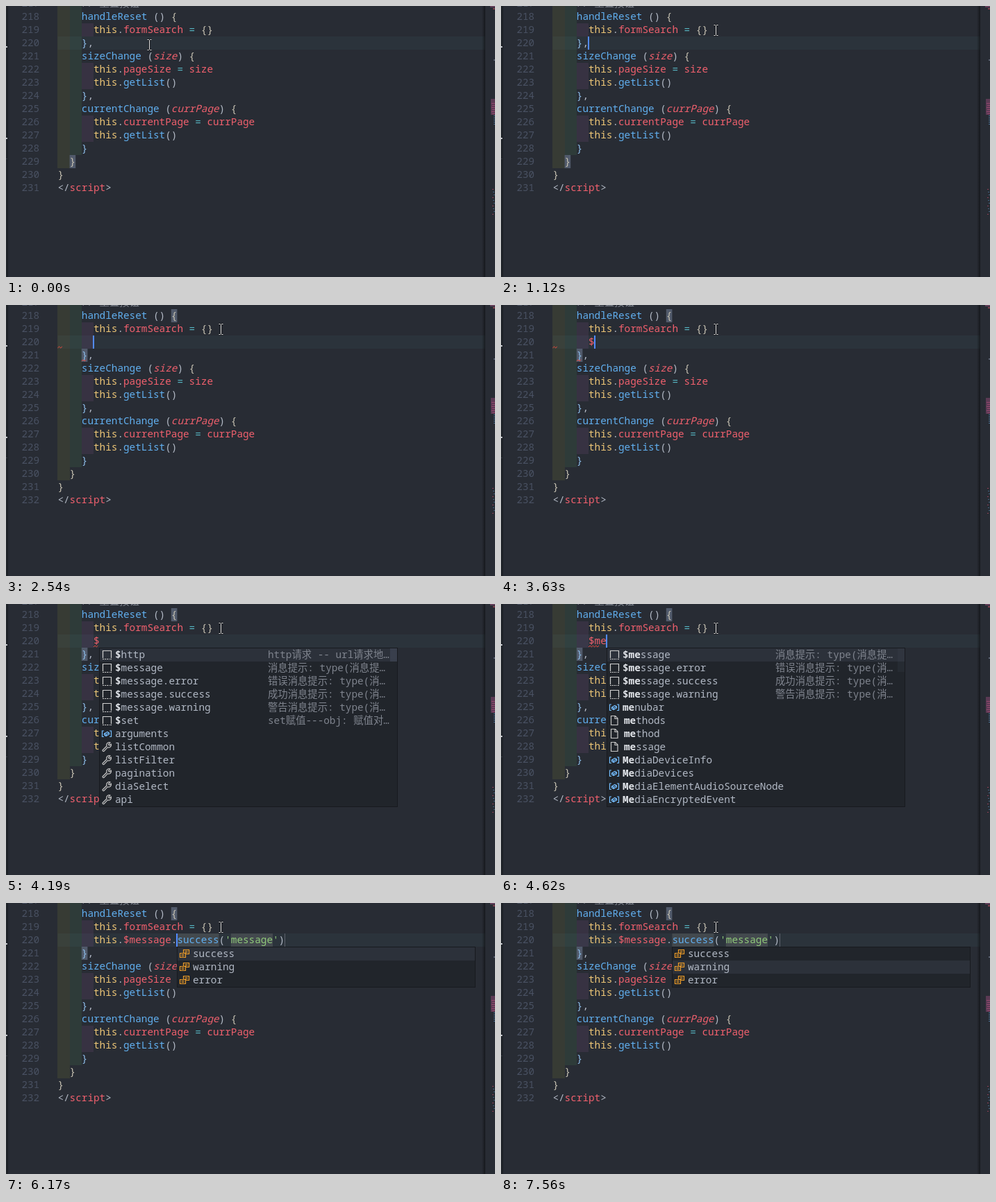
These frames come from a looping animation (704 px wide and 391 px high, 8000 ms). An HTML page with a canvas:

```html
<!DOCTYPE html>
<html lang="zh-CN">
<head>
<meta charset="utf-8">
<title>Snippet completion</title>
<style>
html, body { margin: 0; width: 100%; height: 100%; overflow: hidden; background: #282c34; }
canvas { display: block; }
</style>
</head>
<body>
<canvas id="stage" width="704" height="391"></canvas>
<script>
const ctx = document.getElementById('stage').getContext('2d');
const LOOP = 8000, SIZE = 14.333, CHAR = 8.6, LINE = 19, LEFT = 74.4, TOP = 6, EDGE = 690;
const MONO = '"Noto Sans Mono", "DejaVu Sans Mono", "Noto Sans CJK SC", "Noto Sans CJK", monospace';
const COLOR = {
  plain: '#b2b9c5', red: '#f0606d', blue: '#61afef', yellow: '#ebc476', cyan: '#56b6c2',
  green: '#8fc97a', comment: '#7f848e', number: '#495162', match: '#515a6b', line: '#2b333b',
  brace: '#c9c4b4', methodEnd: '#8fc0ec'
};
const RAINBOW = ['rgba(255,255,64,.07)', 'rgba(127,255,127,.07)', 'rgba(255,127,255,.07)'];

const code = `    handleReset () {
      this.formSearch = {}
    },
    sizeChange (size) {
      this.pageSize = size
      this.getList()
    },
    currentChange (currPage) {
      this.currentPage = currPage
      this.getList()
    }
  }
}
<\/script>`.split('\n');

// Each item: icon, label, matched length, detail
const dollar = [
  ['snippet', '$http', 1, 'http请求 -- url请求地…'],
  ['snippet', '$message', 1, '消息提示: type(消息提…'],
  ['snippet', '$message.error', 1, '错误消息提示: type(消…'],
  ['snippet', '$message.success', 1, '成功消息提示: type(消…'],
  ['snippet', '$message.warning', 1, '警告消息提示: type(消…'],
  ['snippet', '$set', 1, 'set赋值---obj: 赋值对…'],
  ['variable', 'arguments', 0],
  ...['listCommon', 'listFilter', 'pagination', 'diaSelect', 'api'].map(name => ['wrench', name, 0])
];
const message = [
  ...dollar.slice(1, 5).map(([icon, label, , detail]) => [icon, label, 3, detail]),
  ['variable', 'menubar', 2],
  ...['methods', 'method', 'message'].map(name => ['page', name, 2]),
  ...['Info', 's', 'ElementAudioSourceNode', 'EncryptedEvent'].map((end, i) =>
    ['variable', (i < 2 ? 'MediaDevice' : 'Media') + end, 2])
];
const choices = ['success', 'warning', 'error'].map(name => ['enum', name, 0]);

const timeline = [
  [0, { mouse: [206, 56], row: 2, col: 6, caret: false, typed: null, brackets: [[11, 2]],
        squiggles: [], stops: [], popup: null }],
  [560, { mouse: [223, 47] }],
  [690, { mouse: [243, 37] }],
  [840, { mouse: [287, 36] }],
  [970, { mouse: [309, 35] }],
  [1120, { caret: true }],
  [1270, { row: 1, col: 26, brackets: [[1, 24], [1, 25]] }],
  [1550, { caret: false }],
  [2110, { caret: true }],
  [2540, { row: 2, col: 6, typed: '', brackets: [[0, 19], [3, 4]], squiggles: [[2, 0, 1], [3, 4, 5]] }],
  [2940, { caret: false }],
  [3500, { caret: true }],
  [3630, { typed: '$', col: 7 }],
  [3780, { squiggles: [[2, 6, 7]], popup: { x: 134, items: dollar, slider: [19, 0.4], selected: 0 } }],
  [4190, { caret: false }],
  [4620, { caret: true, typed: '$me', col: 9, squiggles: [[2, 6, 8]],
           popup: { x: 152, items: message, slider: [34, 0.12], selected: 0 } }],
  [4770, { squiggles: [[2, 6, 9]] }],
  [5180, { caret: false }],
  [5600, { caret: true }],
  [6170, { typed: "this.$message.success('message')", col: 20, squiggles: [],
           stops: [[20, 27], [29, 36]], popup: { x: 246, items: choices, selected: 0 } }],
  [6580, { caret: false }],
  [7160, { caret: true }],
  [7440, { popup: { x: 246, items: choices, selected: 1 } }],
  [7560, { caret: false }]
];

const stateAt = t => Object.assign({}, ...timeline.filter(([at]) => at <= t).map(([, change]) => change));
const colX = col => LEFT + col * CHAR;
const rowY = row => TOP + row * LINE;

function box(x, y, w, h, color) {
  ctx.fillStyle = color;
  ctx.fillRect(x, y, w, h);
}

// Chinese characters take a full em, all others one cell
function mono(text, x, y, color, style = '') {
  ctx.font = `${style} ${SIZE}px ${MONO}`;
  ctx.fillStyle = color;
  for (const char of text) {
    ctx.fillText(char, x, y);
    x += /\p{Script=Han}/u.test(char) ? SIZE : CHAR;
  }
}

const rules = [
  [/^ {4}\}/, COLOR.methodEnd],
  [/^[{}]/, COLOR.brace],
  [/^'[^']*'/, COLOR.green],
  [/^this\b/, COLOR.yellow],
  [/^\w+(?= ?\()/, COLOR.blue],
  [/^[$\w]+/, COLOR.red],
  [/^=/, COLOR.cyan],
  [/^./, COLOR.plain]
];

function codeLine(text, row) {
  for (let col = 0; col < text.length;) {
    const rest = text.slice(col);
    const [pattern, color] = rules.find(([p]) => p.test(rest));
    const token = rest.match(pattern)[0];
    const isParam = /\w/.test(token) && text.slice(0, col).endsWith(' (');
    mono(token, colX(col), rowY(row) + 14, color, isParam ? 'italic' : '');
    col += token.length;
  }
}

function squiggle([row, from, to]) {
  const end = colX(to), y = rowY(row) + 18;
  ctx.beginPath();
  for (let x = colX(from), i = 0; x <= end; x += 2.15, i++) ctx.lineTo(x, y - (i % 2) * 2);
  ctx.strokeStyle = '#f0483e';
  ctx.lineWidth = 1;
  ctx.stroke();
}

// Icons live in a 16 by 16 box; the last value widens the gap to the label
const icons = {
  snippet: ['#d0d0d0', 'M2.5 13V2.5H14.5V13M2 14.5h2M5 14.5h2M8 14.5h2M11 14.5h1M13 14.5h2', 0],
  variable: ['#75beff', 'M4 4H1.5V12.5H4M12 4H14.5V12.5H12M4.5 8L9 5.5L11.5 7V9L7 11.5L4.5 10ZM4.5 8L7 9.2L11.5 7M7 9.2V11.5', 0],
  wrench: ['#c5c5c5', 'M2 13L8 7Q7 3.5 10 2Q11.5 1.3 13 2L10.5 4.5L11.5 6L14.3 4.2Q15 7 12.8 8.4Q11 9.5 9.5 8.7L4 14.5Q2 15 2 13Z', 0],
  page: ['#c5c5c5', 'M3.5 1.5H9.5L13 5V14.5H3.5ZM9 1.5V5.5H13', 2],
  enum: ['#ee9d28', 'M6.5 7V2.5H14.5V8.5H10M8.5 4.5H12.5M8.5 6.5H12.5M1.5 7.5H9.5V13.5H1.5ZM3.5 9.5H7.5M3.5 11.5H7.5', 0]
};

function drawIcon([color, path], x, y) {
  ctx.save();
  ctx.translate(x, y);
  ctx.strokeStyle = color;
  ctx.lineWidth = 1.2;
  ctx.stroke(new Path2D(path));
  ctx.restore();
}

function drawPopup({ x, items, slider, selected }) {
  const y = 63, width = 430, height = items.length * LINE + 2;
  box(x, y, width, height, '#181a1f');
  box(x + 1, y + 1, width - 2, height - 2, '#21252b');
  box(x + 1, y + 1 + selected * LINE, width - 2, LINE, '#2c313a');
  if (slider) box(x + width - 11, y + 1, 10, slider[0], `rgba(78,86,102,${slider[1]})`);
  items.forEach(([name, label, matched, detail = ''], i) => {
    const icon = icons[name], top = y + 1 + i * LINE, labelX = x + 23 + icon[2];
    drawIcon(icon, x + 3, top + 1);
    mono(label.slice(0, matched), labelX, top + 14, '#e2e5ea', 'bold');
    mono(label.slice(matched), labelX + matched * CHAR, top + 14, COLOR.plain);
    mono(detail, x + 243, top + 14, COLOR.comment);
  });
}

function drawMouse([x, y]) {
  const beam = new Path2D(`M${x - 2.5} ${y - 7.5}h2l1 1l1-1h2M${x + .5} ${y - 6.5}v13M${x - 2.5} ${y + 7.5}h2l1-1l1 1h2`);
  for (const [color, width] of [['#16181c', 2.4], ['#e4e4e4', 1]]) {
    ctx.strokeStyle = color;
    ctx.lineWidth = width;
    ctx.stroke(beam);
  }
}

function drawEdges() {
  box(0, 0, 3, 391, '#21252b');
  box(2, 0, 1, 391, '#1b1e23');
  box(0, 220, 2, 1, '#3a3f4a');
  for (const y of [58, 190]) box(0, y, 2, 2, '#c5c8ce');

  const shade = ctx.createLinearGradient(EDGE - 5, 0, EDGE, 0);
  shade.addColorStop(0, 'rgba(0,0,0,0)');
  shade.addColorStop(1, 'rgba(0,0,0,.45)');
  box(EDGE - 5, 0, 5, 391, shade);
  box(EDGE, 0, 14, 391, '#282c34');
  box(697, 0, 7, 2, '#63405a');
  box(701, 3, 3, 2, '#84404f');
  box(702, 77, 2, 2, '#596070');
  box(698, 134, 6, 23, '#5b3a54');
  for (let y = 140; y < 156; y += 3) box(699 + y % 2, y, 5, 1, '#94486f');
  for (let y = 158; y < 171; y += 3) box(700 + y % 3, y, 3, 1, '#4b7296');
  for (let y = 264; y < 304; y += 4) box(700 + y / 4 % 3, y, 2, 1, y % 3 ? '#41637f' : '#8c4054');
}

function draw(t) {
  const state = stateAt(t);
  const lines = [...code];
  if (state.typed !== null) lines.splice(2, 0, '      ' + state.typed);

  box(0, 0, 704, 391, '#282c34');
  box(LEFT, rowY(state.row), EDGE - LEFT, LINE, COLOR.line);
  ['    //', ...lines].forEach((line, i) => {
    const indent = line.match(/^ */)[0].length;
    for (let level = 0; level < indent / 2; level++) {
      const x = Math.round(colX(level * 2));
      box(x, rowY(i - 1), Math.round(colX(level * 2 + 2)) - x, LINE, RAINBOW[level]);
    }
    mono(String(217 + i), 22.4, rowY(i - 1) + 14, COLOR.number);
  });

  for (const [row, col] of state.brackets) box(colX(col), rowY(row), CHAR, LINE, COLOR.match);
  for (const [from, to] of state.stops) box(colX(from), rowY(2), (to - from) * CHAR, LINE, 'rgba(124,124,124,.3)');
  if (state.stops.length) box(401, rowY(2), 1, LINE, '#5c616b');

  mono('// 重置按钮', colX(4), rowY(-1) + 14, COLOR.comment);
  lines.forEach(codeLine);
  state.squiggles.forEach(squiggle);
  if (state.caret) box(Math.round(colX(state.col)) - 1, rowY(state.row), 2, LINE, '#528bff');
  drawEdges();
  if (state.popup) drawPopup(state.popup);
  drawMouse(state.mouse);
}

const start = performance.now();
function tick() {
  draw((performance.now() - start) % LOOP);
  requestAnimationFrame(tick);
}
tick();
</script>
</body>
</html>
```
